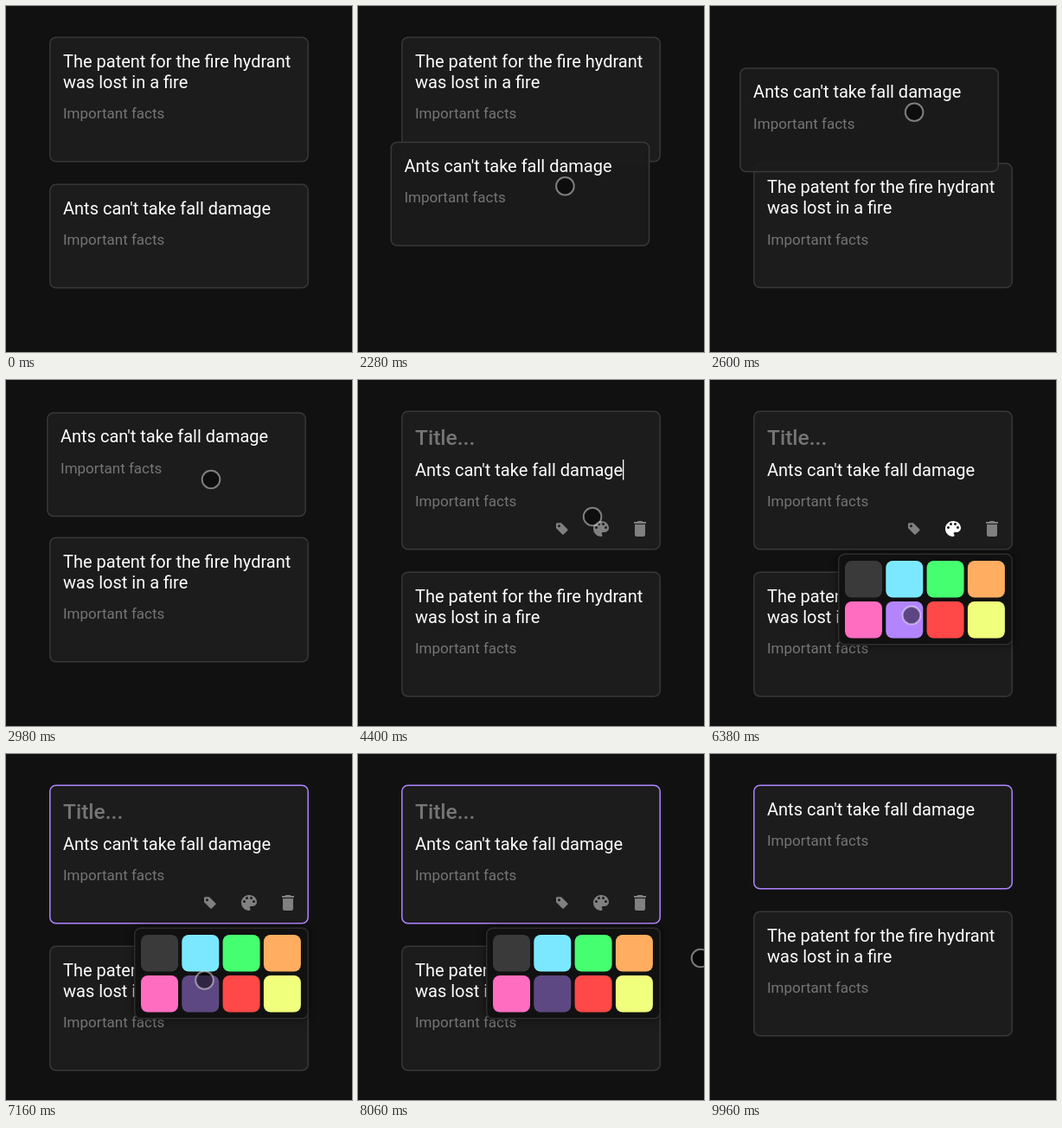
Animation, 400 px wide and 400 px high, one loop 10000 ms. Source, as an HTML page with a canvas:

```html
<!DOCTYPE html>
<html lang="en">
<head>
<meta charset="utf-8">
<title>Note cards</title>
<style>
html, body { margin: 0; width: 100%; height: 100%; overflow: hidden; background: #111; }
canvas { display: block; width: 400px; height: 400px; }
</style>
</head>
<body>
<canvas id="stage"></canvas>
<script>
const LOOP = 10000;
const canvas = document.getElementById('stage');
const ctx = canvas.getContext('2d');
const dpr = window.devicePixelRatio || 1;
canvas.width = canvas.height = 400 * dpr;

const GREY = '#757575', LINE = '#383838', PURPLE = '#b285ff';
const SWATCHES = ['#3a3a3a', '#7ce8ff', '#45ff70', '#ffad61',
                  '#ff6dc0', PURPLE, '#ff4848', '#f0ff7c'];
const TAG = new Path2D('M2 1a1 1 0 0 0-1 1v4.586a1 1 0 0 0 .293.707l7 7a1 1 0 0 0 1.414 0l4.586-4.586a1 1 0 0 0 0-1.414l-7-7A1 1 0 0 0 6.586 1H2zm4 3.5a1.5 1.5 0 1 1-3 0 1.5 1.5 0 0 1 3 0z');
const PALETTE = new Path2D('M12 3c-4.97 0-9 4.03-9 9s4.03 9 9 9c.83 0 1.5-.67 1.5-1.5 0-.39-.15-.74-.39-1.01-.23-.26-.38-.61-.38-.99 0-.83.67-1.5 1.5-1.5H16c2.76 0 5-2.24 5-5 0-4.42-4.03-8-9-8z' +
  [[6.5, 10.5], [9.5, 6.5], [14.5, 6.5], [17.5, 10.5]]
    .map(([x, y]) => `M${x - 1.5} ${y}a1.5 1.5 0 1 0 3 0a1.5 1.5 0 1 0-3 0z`).join(''));
const TRASH = new Path2D('M6 19c0 1.1.9 2 2 2h8c1.1 0 2-.9 2-2V7H6v12zM19 4h-3.5l-1-1h-5l-1 1H5v2h14V4z');

// Cursor legs: start, duration, from, to, sideways bend
const LEGS = [
  [820, 1000, [262, 412], [252, 257], 0],
  [1840, 1000, [252, 257], [237, 115], -16.5],
  [3840, 1000, [237, 115], [288.5, 180], 0],
  [4900, 1000, [288.5, 180], [240, 278], 0],
  [5920, 1000, [240, 278], [222, 262.6], 0],
  [6940, 1000, [222, 262.6], [396, 236], 0],
  [8500, 140, [396, 236], [414, 236], 0],
];

const ramp = (t, start, length) => Math.min(1, Math.max(0, (t - start) / length));
const mix = (a, b, p) => a + (b - a) * p;
const inOut = p => p < .5 ? 4 * p ** 3 : 1 - 4 * (1 - p) ** 3;
const out = (p, power = 3) => 1 - (1 - p) ** power;

function cursorAt(t) {
  const [start, length, a, b, bend] = LEGS.filter(leg => t >= leg[0]).pop() || LEGS[0];
  const p = inOut(ramp(t, start, length));
  return [mix(a[0], b[0], p) + 2 * p * (1 - p) * bend, mix(a[1], b[1], p)];
}

function text(str, x, y, size, color, weight = 400) {
  ctx.font = `${weight} ${size}px Roboto, sans-serif`;
  ctx.fillStyle = color;
  ctx.fillText(str, x, y);
}

function box(x, y, w, h, r, fill, stroke) {
  ctx.beginPath();
  ctx.roundRect(x, y, w, h, r);
  ctx.fillStyle = fill;
  ctx.fill();
  if (!stroke) return;
  ctx.shadowColor = 'transparent';
  ctx.strokeStyle = stroke;
  ctx.lineWidth = 1.5;
  ctx.stroke();
}

function icon(path, x, y, color) {
  ctx.save();
  ctx.translate(x, y);
  ctx.fillStyle = color;
  ctx.fill(path, 'evenodd');
  ctx.restore();
}

function card(x, y, h, lines, border = LINE, fill = '#1c1c1c', shift = 0) {
  box(x + .8, y + .2, 298.4, h - .4, 7, fill, border);
  lines.forEach((line, i) => text(line, x + 16, y + 34.5 + shift + i * 24, 20, '#fff'));
  text('Important facts', x + 16, y + 46 + shift + lines.length * 24, 17, GREY);
}

function popup(picked) {
  ctx.save();
  ctx.shadowColor = 'rgba(0,0,0,.7)';
  ctx.shadowBlur = 8 * dpr;
  box(148.7, 201.2, 200.6, 104.6, 7, '#111', '#2e2e2e');
  ctx.restore();
  SWATCHES.forEach((color, i) => {
    ctx.globalAlpha = picked && color === PURPLE ? .48 : 1;
    box(156 + i % 4 * 47.3, 209 + (i >> 2) * 47, 43, 42.6, 8, color);
  });
  ctx.globalAlpha = 1;
}

function draw(t) {
  ctx.setTransform(dpr, 0, 0, dpr, 0, 0);
  ctx.fillStyle = '#111';
  ctx.fillRect(0, 0, 400, 400);

  const [cx, cy] = cursorAt(t);
  const dragging = t >= 1840 && t < 2840;
  const editing = t >= 3860 && t < 8100;
  const menu = t >= 4840 && t < 8100;
  const picked = t >= 6940;

  // The open card pushes the other one down by 40px
  const grow = 40 * (out(ramp(t, 3860, 180)) - out(ramp(t, 8100, 280)));
  const patentY = mix(36, 182, inOut(ramp(t, 2360, 260))) + grow;

  let x = 50, y = 206;
  if (dragging) {
    x += cx - 252;
    y += cy - 257;
  } else if (t >= 2840) {
    const drop = ramp(t, 2840, 280);
    x = mix(35, 50, out(drop, 2.3));
    y = mix(64, 36, out(drop, 4));
  }

  card(50, patentY, 144, ['The patent for the fire hydrant', 'was lost in a fire']);
  card(x, y, 120 + grow, ["Ants can't take fall damage"],
    picked ? PURPLE : LINE, dragging ? 'rgba(28,28,28,.92)' : '#1c1c1c', editing ? 40 : 0);

  if (editing) {
    text('Title...', 66, 75.3, 24.5, GREY, 500);
    icon(TAG, 228, 164.3, '#808080');
    icon(PALETTE, 269, 160, menu && !picked ? '#fff' : '#808080');
    icon(TRASH, 314, 160, '#808080');
    if (!menu) {
      ctx.fillStyle = '#fff';
      ctx.fillRect(306, 92, 1.3, 23.5);
    }
  }
  if (menu) popup(picked);

  if (t >= 820 && t < 8640) {
    ctx.beginPath();
    ctx.arc(cx, cy, 10.3, 0, 2 * Math.PI);
    ctx.fillStyle = 'rgba(0,0,0,.48)';
    ctx.fill();
    ctx.strokeStyle = 'rgba(255,255,255,.45)';
    ctx.lineWidth = 2;
    ctx.stroke();
  }
}

const began = performance.now();
function tick() {
  draw((performance.now() - began) % LOOP);
  requestAnimationFrame(tick);
}
tick();
</script>
</body>
</html>
```
